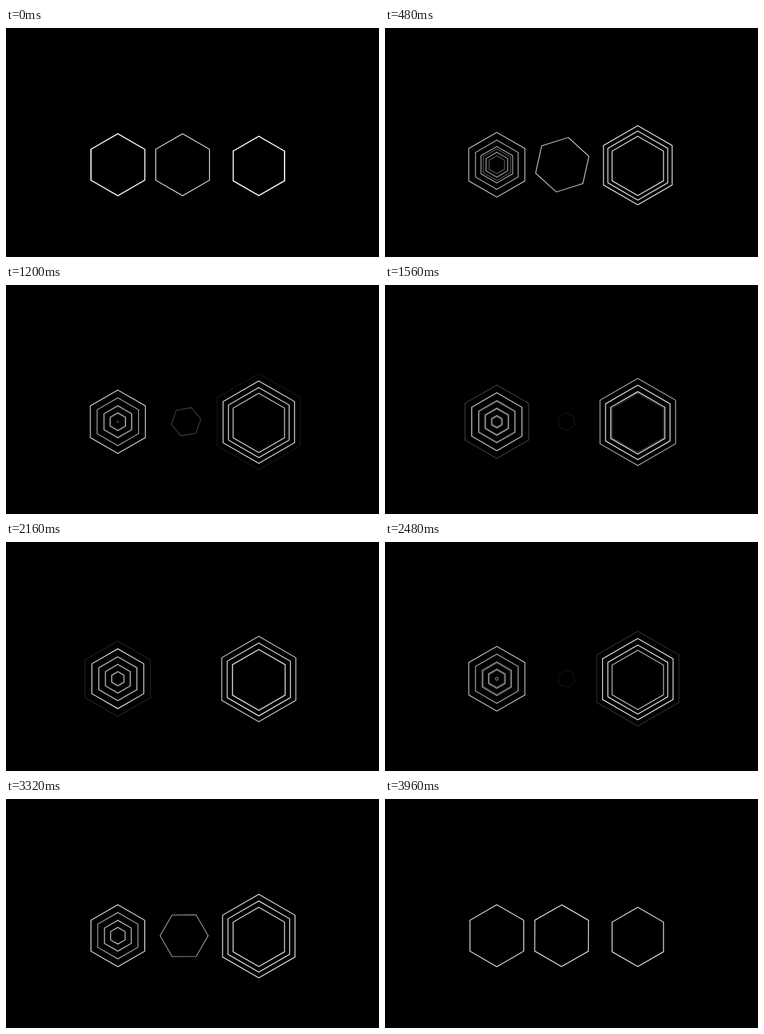
Recreate the animation shown at these times as an HTML page with a canvas. Size 553x340 px, loop 4 s.

```html
<!DOCTYPE html>
<html lang="en">
<head>
<meta charset="utf-8">
<title>Hexagon pulses</title>
<style>
  html, body { margin: 0; width: 100%; height: 100%; overflow: hidden; background: #000; }
  canvas { display: block; }
</style>
</head>
<body>
<canvas id="stage" width="553" height="340"></canvas>
<script>
const ctx = document.getElementById('stage').getContext('2d');
const LOOP = 4000, CYCLES = 6, BEAT = LOOP / CYCLES;
const INNER = [46, 34.4, 22.9, 12.4, 0];
const OUTER = [44, 52.8, 62, 72.2];

const easeSine = x => (1 - Math.cos(Math.PI * x)) / 2;
const easeQuad = x => x < 0.5 ? 2 * x * x : 1 - 2 * (1 - x) ** 2;
const mix = (a, b, k) => a + (b - a) * k;

function hexagon(x, y, r, alpha = 1, angle = 0, width = 1.25) {
  if (r < 0.5 || alpha < 0.01) return;
  ctx.beginPath();
  for (let i = 0; i < 6; i++) {
    const a = angle + i * Math.PI / 3;
    ctx.lineTo(x + r * Math.sin(a), y - r * Math.cos(a));
  }
  ctx.closePath();
  ctx.globalAlpha = alpha;
  ctx.lineWidth = width;
  ctx.stroke();
}

// Rings sink inward; the first beat unpacks them, the last one empties the middle.
function sinkingRings(cycle, phase) {
  const ring = (r, alpha) => hexagon(165.8, 203, r, alpha * Math.min(1, r / 3));
  const first = cycle === 0, last = cycle === CYCLES - 1;
  const k = easeSine(phase), early = easeSine(Math.min(1, phase * 1.25));
  if (last) ring(INNER[0], 1);
  else ring(mix(57.5, INNER[0], k), k);
  for (let i = last ? 1 : 0; i < (first ? 3 : 4); i++) {
    const from = INNER[first ? 0 : i], to = last ? 0 : INNER[i + 1];
    // Inner rings are dimmer and push a faint copy ahead of them.
    ring(mix(from, to, k), i ? 0.7 : mix(1, 0.7, k));
    if (i) ring(mix(from, to, early), 0.35);
  }
}

// Rings spread outward and fade past the rim.
function spreadingRings(cycle, phase) {
  const ring = (r, alpha) => hexagon(374.8, 204.8 - (r - 44) * 0.07, r, alpha);
  const first = cycle === 0, last = cycle === CYCLES - 1;
  const k = easeSine(phase);
  ring(OUTER[0], first || last ? 1 : k);
  for (let i = last ? 1 : 0; i < (first ? 2 : 3); i++) {
    const target = last ? 3 : i + 1;
    ring(mix(OUTER[first ? 0 : i], OUTER[target], k), target === 3 ? 1 - k : 1);
  }
}

function spinner(t) {
  const s = Math.max(0, t - 26) / (LOOP / 2);
  const x = s > 1 ? 2 - s : s;
  const k = easeSine(x), r = mix(46, 8.6, k);
  const angle = easeQuad(x) * Math.PI * 2 / 3;
  hexagon(261.8 + (46 - r) * 0.22, 203, r, 1 - k, angle, mix(1.25, 0.6, k));
}

function draw(now) {
  const t = now % LOOP;
  const cycle = Math.floor(t / BEAT);
  const phase = t / BEAT - cycle;
  ctx.globalCompositeOperation = 'source-over';
  ctx.globalAlpha = 1;
  ctx.fillStyle = '#000';
  ctx.fillRect(0, 0, 553, 340);
  // Overlapping rings must not build up thicker lines.
  ctx.globalCompositeOperation = 'lighten';
  ctx.strokeStyle = '#eee';
  sinkingRings(cycle, phase);
  spinner(t);
  spreadingRings(cycle, phase);
}

const start = performance.now();
function tick() {
  draw(performance.now() - start);
  requestAnimationFrame(tick);
}
tick();
</script>
</body>
</html>
```
